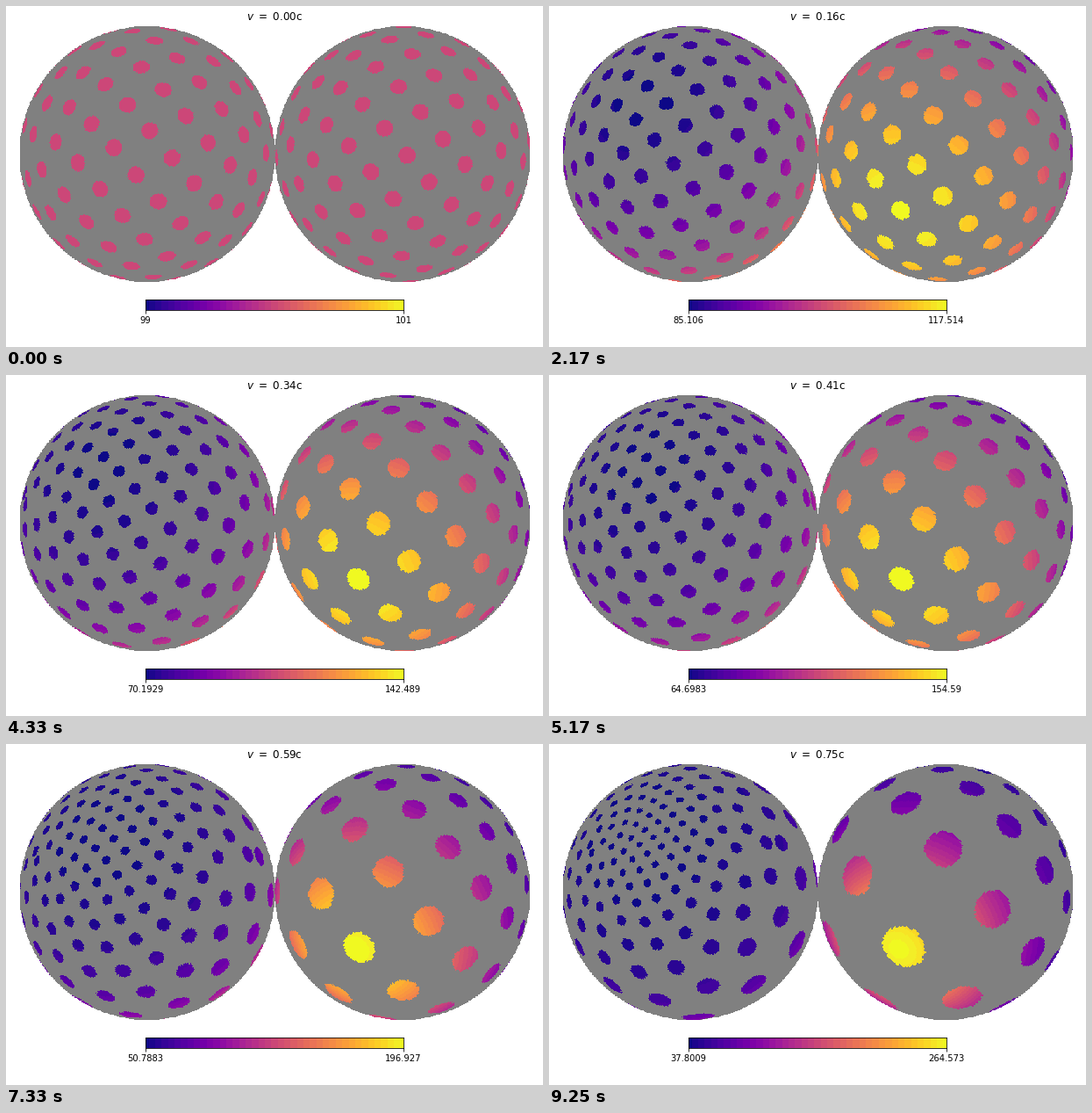
These frames come from a looping animation (612x388 px, 9740 ms). A matplotlib script:

```python
import numpy as np
import matplotlib.pyplot as plt
from matplotlib.animation import FuncAnimation

W, H = 612, 388
TICK, LOOP = 20, 9740
HOLD, STEP, LAST = 370, 120, 75     # ms, ms, final speed in hundredths of c
LEFT, TOP, R = 15, 22.75, 145.75    # corner of the sky map, globe radius
MAP_W, MAP_H = 800, 400             # resolution of the projected map
NSIDE = 128
SPOTS, SPOT_R = 150, 0.067
GREY = 128
LEVELS = 40


def snap(v):
    """Move each direction to the centre of its equal-area sky pixel."""
    x, y, z = v
    n = NSIDE
    t = np.arctan2(y, x) % (2 * np.pi) / (np.pi / 2)
    # equatorial belt
    p = np.floor(n * (t + 0.5 - 0.75 * z))
    m = np.floor(n * (t + 0.5 + 0.75 * z))
    z_belt, t_belt = (m - p) / (1.5 * n), (p + m + 1) / (2 * n) - 0.5
    # polar caps
    h = n * np.sqrt(3 * np.maximum(1 - np.abs(z), 0))
    q = np.floor(t)
    j, k = np.floor((t - q) * h), np.floor((1 - t + q) * h)
    ring = j + k + 1
    z_cap = np.sign(z) * (1 - ring ** 2 / (3 * n * n))
    t_cap = q + (j + 0.5) / ring
    cap = np.abs(z) > 2 / 3
    z = np.where(cap, z_cap, z_belt)
    phi = np.where(cap, t_cap, t_belt) * np.pi / 2
    s = np.sqrt(np.maximum(1 - z * z, 0))
    return np.array([s * np.cos(phi), s * np.sin(phi), z])


def fibonacci(n):
    i = np.arange(n)
    y = 1 - 2 * i / (n - 1)
    r = np.sqrt(1 - y * y)
    a = np.pi * (3 - np.sqrt(5)) * i
    return np.array([np.cos(a) * r, y, np.sin(a) * r])


def disc_view():
    """Mask of both discs and the direction seen at each masked pixel."""
    py, px = np.mgrid[:H, :W] + 0.5
    col = np.floor((px - LEFT) / (4 * R) * MAP_W)
    row = np.floor((py - TOP) / (2 * R) * MAP_H)
    x = 4 * col / (MAP_W - 1) - 2
    z = 1 - 2 * row / (MAP_H - 1)
    back = x > 0
    x = np.where(back, x - 1, x + 1)
    depth = 1 - x * x - z * z
    mask = depth > 0
    side = np.where(back, -1, 1)[mask]
    return mask, np.array([side * np.sqrt(depth[mask]), -side * x[mask], z[mask]])


mask, view = disc_view()
sky = snap(view)
spots = fibonacci(SPOTS).T.astype(np.float32)
dy, dz = -0.369, -0.449
heading = np.array([-np.sqrt(1 - dy * dy - dz * dz), dy, dz])
cos_sky = heading @ sky
bands = plt.get_cmap("plasma")(np.arange(LEVELS + 1) / LEVELS)[:, :3]


def doppler(beta, c):
    return 100 * np.sqrt(1 - beta ** 2) / (1 - beta * c)


def limits(beta):
    """Faintest and brightest spot values."""
    if beta == 0:
        return 99, 101
    k = np.sqrt((1 + beta) / (1 - beta))
    edge = 2 * np.arctan(np.tan((0.044 + 0.024 * beta) / 2) / k)
    return doppler(beta, -np.cos(edge)), doppler(beta, 1 - 2.65e-6)


def paint(beta):
    g = 1 / np.sqrt(1 - beta ** 2)
    rest = sky + heading[:, None] * ((g - 1) * cos_sky + g * beta)
    rest = snap(rest / (g * (1 + beta * cos_sky))).astype(np.float32)
    lit = (spots @ rest).max(axis=0) > np.cos(SPOT_R)
    lo, hi = limits(beta)
    level = (doppler(beta, cos_sky[lit]) - lo) / (hi - lo) * LEVELS
    level = np.clip(np.round(level).astype(int), 0, LEVELS)
    colors = np.full((lit.size, 3), GREY, np.uint8)
    colors[lit] = np.round(bands[level] * 255)
    img = np.full((H, W, 3), 255, np.uint8)
    img[mask] = colors
    return img


fig = plt.figure(figsize=(8.5, 5.389), dpi=72, facecolor="white")
globe = fig.figimage(np.full((H, W, 3), 255, np.uint8), origin="upper", zorder=-1)
title = fig.text(0.5, 372 / H, "", size=12, ha="center", va="baseline")

bar = fig.add_axes([159.12 / W, (H - 345.9) / H, 293.76 / W, 11.75 / H])
half = 0.5 / LEVELS
bar.imshow(bands[None], aspect="auto", extent=(-half, 1 + half, 0, 1),
           interpolation="nearest")
bar.set_xlim(0, 1)
bar.set_yticks([])
bar.tick_params(labelsize=10)

pictures = {}
shown = {"step": None}


def update(i):
    t = i * TICK + TICK // 2
    step = min(max((t - HOLD) // STEP + 1, 0), LAST)
    if step != shown["step"]:
        beta = step / 100
        if step not in pictures:
            pictures[step] = paint(beta)
        globe.set_data(pictures[step])
        title.set_text(rf"$v\ =\ ${beta:.2f}c")
        bar.set_xticks([0, 1], [f"{v:g}" for v in limits(beta)])
        shown["step"] = step
    return globe, title


anim = FuncAnimation(fig, update, frames=LOOP // TICK, interval=TICK,
                     repeat=True, repeat_delay=0, blit=False)
plt.show()
```
